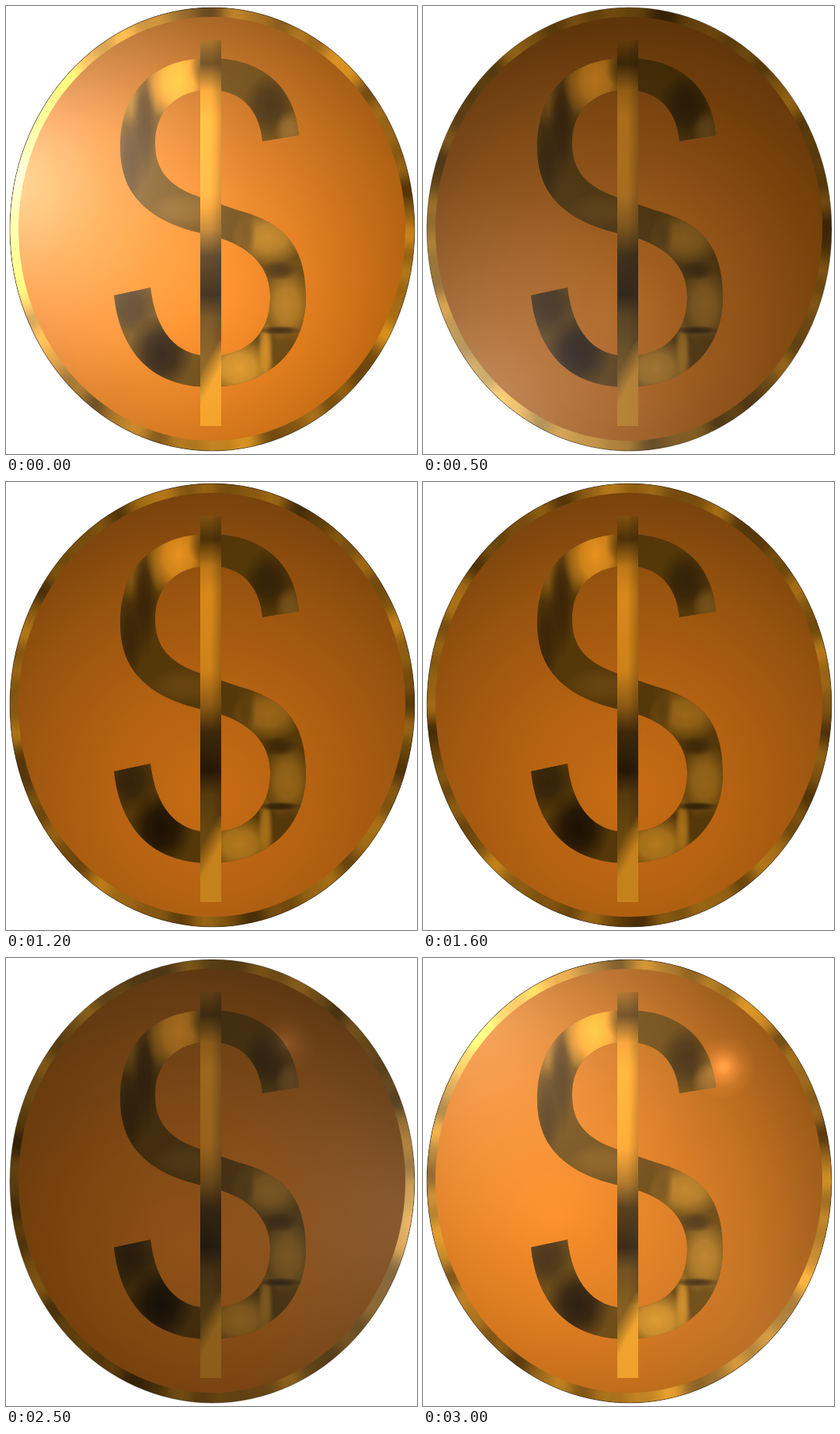
Recreate the animation shown at these times as an HTML page with a canvas. Size 529x576 px, loop 3100 ms.

```html
<!DOCTYPE html>
<html lang="en">
<head>
<meta charset="utf-8">
<title>Gold dollar coin</title>
<style>
html, body { margin: 0; width: 529px; height: 576px; overflow: hidden; background: #fff; }
canvas { display: block; }
</style>
</head>
<body>
<canvas id="stage" width="529" height="576"></canvas>
<script>
const ctx = document.getElementById('stage').getContext('2d');
const STEP = 100, STEPS = 31, TAU = Math.PI * 2;

const coin = new Path2D(), face = new Path2D(), rim = new Path2D();
coin.ellipse(265.5, 287, 260.5, 285, 0, 0, TAU);
face.ellipse(265, 286.5, 249, 272.5, 0, 0, TAU);
rim.addPath(coin);
rim.addPath(face);
const letter = new Path2D(`M377 166C372 104 330 67 262 67C190 67 147 110 147 182
  C147 248 190 277 250 292L277 299C320 313 340 340 340 374C340 425 305 450 264 450
  C218 450 193 418 186 362L139 372C147 447 190 490 262 490C340 490 386 440 386 375
  C386 308 358 279 300 263L250 246C210 232 192 212 192 176C192 133 222 108 262 108
  C302 108 326 132 330 174Z`);

// Reflections in the letter: x, y, rx, ry, colour
const patches = [
  [170, 110, 38, 50, '#8c5b14'], [178, 150, 17, 80, '#3a2508'],
  [160, 200, 18, 60, '#3c2608'], [222, 94, 42, 64, '#e8921e'],
  [232, 262, 50, 24, '#684510'], [270, 82, 36, 28, '#543609'],
  [338, 128, 34, 42, '#352208'], [366, 160, 20, 26, '#76511a'],
  [338, 298, 48, 36, '#9a6718'], [308, 292, 14, 36, '#5d3e0d'],
  [362, 385, 34, 50, '#966519'], [352, 340, 24, 13, '#3e2809'],
  [300, 466, 48, 40, '#b47a1e'], [334, 445, 10, 46, '#a87019'],
  [364, 448, 18, 36, '#553809'], [352, 417, 30, 6, '#33210a'],
  [160, 385, 34, 40, '#35230a'], [200, 445, 42, 50, '#1c1104']
];

// step, brightness, face centre, light A (x, y, alpha), light B (x, y, alpha)
const keys = [
  [0, 1.18, 265, 375, 0, 220, .6, 400, 590, 0],
  [5, .76, 270, 385, 50, 530, .38, 300, 600, 0],
  [9, 1, 265, 400, 200, 600, 0, 330, 0, 0],
  [16, 1, 265, 400, 300, 0, 0, 400, 20, 0],
  [20, .43, 255, 390, 250, 0, 0, 490, 140, .12],
  [25, .68, 225, 375, 160, 20, .04, 535, 340, .18],
  [30, 1.16, 170, 335, 65, 80, .33, 480, 500, .12],
  [31, 1.18, 265, 375, 0, 220, .6, 400, 590, 0]
];

function pose(step) {
  const i = keys.findIndex(k => k[0] > step);
  const a = keys[i - 1], b = keys[i], u = (step - a[0]) / (b[0] - a[0]);
  return a.map((v, j) => v + (b[j] - v) * u);
}

function addStops(gradient, stops) {
  stops.forEach(([at, color]) => gradient.addColorStop(at, color));
  return gradient;
}

const radial = (x, y, r, stops) => addStops(ctx.createRadialGradient(x, y, 0, x, y, r), stops);
const linear = (x1, y1, x2, y2, stops) => addStops(ctx.createLinearGradient(x1, y1, x2, y2), stops);

function within(path, draw, rule) {
  ctx.save();
  ctx.clip(path, rule);
  draw();
  ctx.restore();
}

function patch([x, y, rx, ry, color]) {
  ctx.save();
  ctx.translate(x, y);
  ctx.scale(rx, ry);
  ctx.fillStyle = radial(0, 0, 1, [[0, color], [.45, color + 'd0'], [1, color + '00']]);
  ctx.fillRect(-1, -1, 2, 2);
  ctx.restore();
}

function drawRim(step) {
  const p = step / STEPS * TAU, g = ctx.createConicGradient(0, 265, 287);
  for (let i = 0; i <= 180; i++) {
    const a = i / 180 * TAU;
    const wave = Math.sin(5 * a - p) + Math.sin(13 * a - 3 * p + 1)
      + .7 * Math.sin(22 * a - 4 * p + 2) + .4 * Math.sin(37 * a - 6 * p);
    const v = Math.max(0, Math.min(1, .4 + wave * .16));
    g.addColorStop(i / 180, `rgb(${72 + 142 * v},${45 + 98 * v},${7 + 22 * v})`);
  }
  ctx.fillStyle = g;
  ctx.fill(coin);
}

function drawFace(x, y) {
  ctx.fillStyle = radial(x, y, 410, [[0, '#c86c14'], [.35, '#b36112'],
    [.65, '#99540f'], [.9, '#7d450d'], [1, '#70400d']]);
  ctx.fill(face);
}

function drawDollar() {
  within(letter, () => {
    ctx.fillStyle = '#553809';
    ctx.fillRect(130, 60, 270, 440);
    patches.forEach(patch);
  });
  ctx.fillStyle = linear(0, 44, 0, 540, [[0, '#80500f'], [.06, '#4c3109'], [.13, '#bb7617'],
    [.2, '#d8881b'], [.4, '#ce8119'], [.49, '#8d5b14'], [.56, '#3d2809'],
    [.66, '#251705'], [.72, '#56390d'], [.83, '#6a480f'], [1, '#7a5212']]);
  ctx.fillRect(250, 44, 27, 496);
  ctx.fillStyle = linear(250, 0, 277, 0, [[.5, '#3a240800'], [1, '#3a240855']]);
  ctx.fillRect(250, 44, 27, 400);
  ctx.fillStyle = linear(256, 460, 274, 470, [[0, '#c5821c00'], [1, '#c5821c']]);
  ctx.fillRect(250, 430, 27, 110);
}

function brighten(k) {
  ctx.save();
  if (k < 1) ctx.fillStyle = `rgba(0,0,0,${1 - k})`;
  else {
    const v = 255 * (1 - 1 / k);
    ctx.globalCompositeOperation = 'color-dodge';
    ctx.fillStyle = `rgb(${v},${v},${v})`;
  }
  ctx.fillRect(0, 0, 529, 576);
  ctx.restore();
}

function light(x, y, alpha, r, tint = '210,208,235') {
  if (alpha <= 0) return;
  ctx.save();
  ctx.globalCompositeOperation = 'lighter';
  ctx.fillStyle = radial(x, y, r, [[0, 1], [.25, .58], [.38, .42], [.6, .19], [.8, .08], [1, 0]]
    .map(([at, a]) => [at, `rgba(${tint},${a * alpha})`]));
  ctx.fillRect(0, 0, 529, 576);
  ctx.restore();
}

function draw(step) {
  const [, k, cx, cy, ax, ay, aa, bx, by, ba] = pose(step);
  ctx.clearRect(0, 0, 529, 576);
  within(coin, () => {
    drawRim(step);
    drawFace(cx, cy);
    drawDollar();
    brighten(k);
    light(ax, ay, aa, 520);
    light(bx, by, ba, 480);
    const spot = Math.max(0, (step - 22) / 8);
    light(360 + 5.4 * (step - 25), 110 + 6 * (step - 25), spot * .38, 42, '255,165,110');
    within(rim, () => {
      light(ax, ay, aa * 1.1, 340, '255,225,110');
      light(bx, by, ba * 2.2, 250, '255,215,140');
    }, 'evenodd');
  });
  ctx.strokeStyle = 'rgba(45,28,5,.6)';
  ctx.lineWidth = .8;
  ctx.stroke(coin);
}

function tick() {
  draw(Math.floor(performance.now() / STEP) % STEPS);
  requestAnimationFrame(tick);
}
tick();
</script>
</body>
</html>
```
